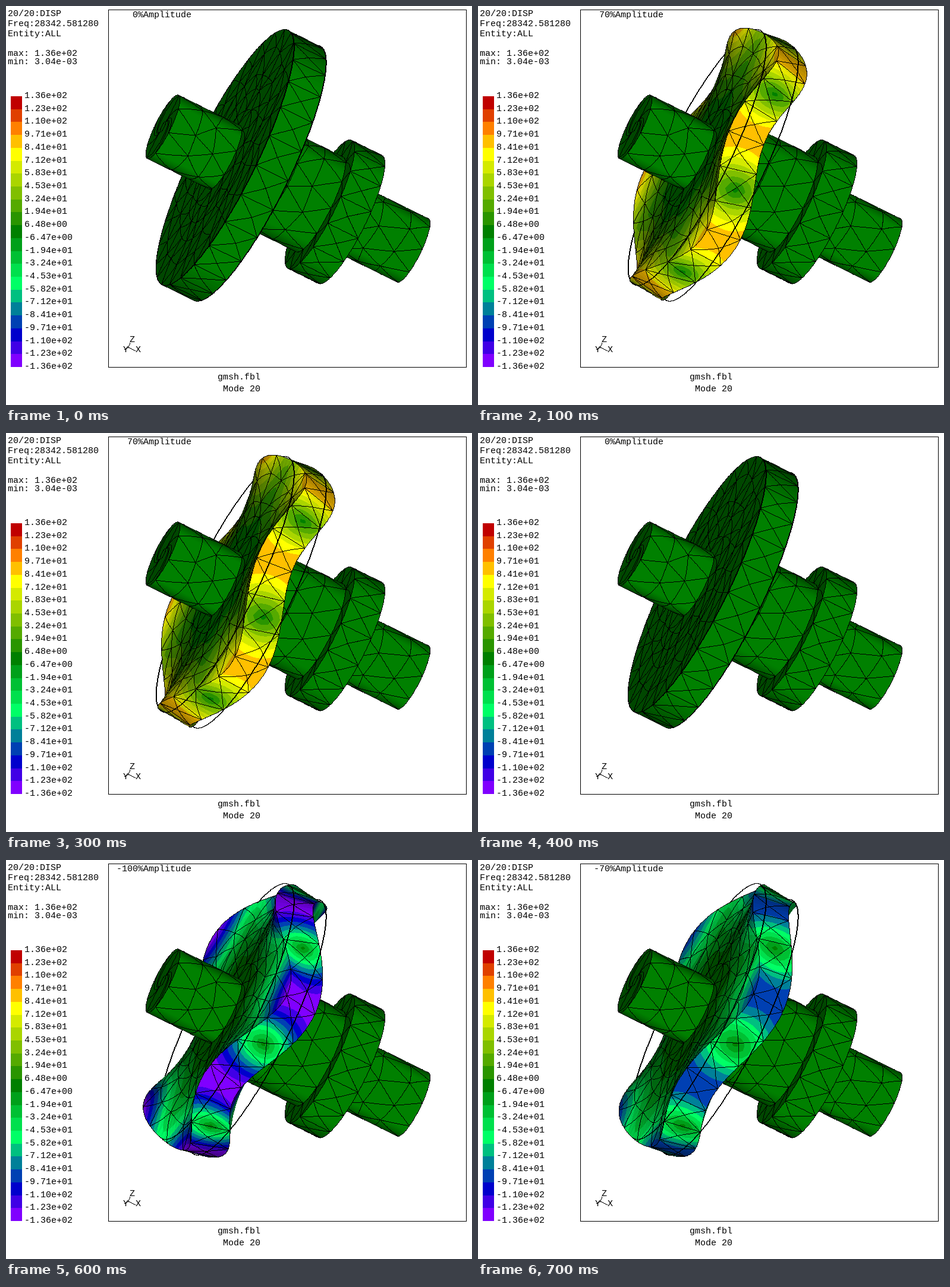
Write an HTML page with a canvas that moves like this. It is 784 px wide and 672 px high and loops after 800 ms.

```html
<!DOCTYPE html>
<html lang="en">
<head>
<meta charset="utf-8">
<title>Mode 20</title>
<style>
html, body { margin: 0; width: 100%; height: 100%; overflow: hidden; background: #fff; }
svg, canvas { position: absolute; left: 0; top: 0; }
text { font: 15px "Liberation Mono", "Courier New", monospace; white-space: pre; }
</style>
</head>
<body>
<svg id="ui" width="784" height="672" shape-rendering="crispEdges">
  <text x="3" y="17">20/20:DISP</text>
  <text x="3" y="34">Freq:28342.581280</text>
  <text x="3" y="51">Entity:ALL</text>
  <text x="3" y="84">max: 1.36e+02</text>
  <text x="3" y="98">min: 3.04e-03</text>
  <text id="amp" x="312" y="19" text-anchor="end">0%Amplitude</text>
  <text x="356" y="629">gmsh.fbl</text>
  <text x="365" y="649">Mode 20</text>
  <g id="legend"></g>
  <path d="M172.5 6.5H774.5V608.5H172.5ZM209 567L206 575L218 581M206 575L199 579" fill="none" stroke="#000"/>
  <text x="208" y="566">Z</text>
  <text x="218" y="583">X</text>
  <text x="197" y="583">Y</text>
</svg>
<canvas id="model" width="784" height="672"></canvas>
<script>
const W = 784, H = 672, TAU = 2 * Math.PI, RAD = Math.PI / 180;
const colors = ('c00000 e04000 ff8000 ffc000 ffff00 d4ea00 aad500 80bf00 55aa00 2a9500 008000 ' +
  '00a01a 00c033 00e04d 00ff66 00c080 008099 0040b3 0000cc 4000e6 8000ff').split(' ');
const pal = colors.map(c => [0, 2, 4].map(i => parseInt(c.slice(i, i + 2), 16)));

// Legend
const labels = ('1.36e+02 1.23e+02 1.10e+02 9.71e+01 8.41e+01 7.12e+01 5.83e+01 4.53e+01 3.24e+01 ' +
  '1.94e+01 6.48e+00 -6.47e+00 -1.94e+01 -3.24e+01 -4.53e+01 -5.82e+01 -7.12e+01 -8.41e+01 ' +
  '-9.71e+01 -1.10e+02 -1.23e+02 -1.36e+02').split(' ');
const STEP = 456 / 21;
document.getElementById('legend').innerHTML =
  colors.map((c, i) => `<rect x="8" y="${152 + i * STEP}" width="19" height="${STEP}" fill="#${c}"/>`).join('') +
  labels.map((t, i) => `<text x="31" y="${155 + Math.round(i * STEP)}">${t}</text>`).join('');

// Orthographic view of a turned part: s runs along the axis, r and f are polar
const X0 = 263.5, Y0 = 203, AX = 0.8962, AY = 0.4436, TILT = 0.22, FLAT = 0.975;
const S1 = 116.3, S2 = 176.4, S3 = 294.6, S4 = 351.5, S5 = 469.5;
const R1 = 59.5, R2 = 239, R3 = 89, R4 = 120.5;
const profile = [[0, 0.01], [0, R1], [S1, R1], [S1, R2], [S2, R2], [S2, R3],
  [S3, R3], [S3, R4], [S4, R4], [S4, R1], [S5, R1], [S5, 0.01]];

// Thick-plate bending with four nodal diameters; TURN scales the section rotation
const WMAX = 30, POW = 2.2, CLAMP = 75, PEAK = 72.5 * RAD, TURN = 0.75;
const UMAX = WMAX * Math.hypot(1, TURN * POW * (S2 - S1) / 2 / FLAT / (R2 - CLAMP));

function point(s, r, f, amp) {
  let v = 0;
  if (amp && r > CLAMP && s < S2 + 1) {
    const h = TURN * (s - (S1 + S2) / 2) / FLAT, q = (r - CLAMP) / (R2 - CLAMP);
    const a = 4 * (f - PEAK), w = amp * WMAX * q ** POW;
    const axial = -w * Math.cos(a);
    const radial = h * w * POW / (r - CLAMP) * Math.cos(a);
    const hoop = -h * 4 * w / r * Math.sin(a);
    v = Math.sign(amp) * 136 * Math.hypot(axial, radial, hoop) / UMAX;
    s += axial * FLAT;
    f += hoop / r;
    r += radial;
  }
  const up = r * Math.cos(f), out = r * Math.sin(f), along = s + TILT * out;
  return {
    x: X0 + AX * along + AY * up,
    y: Y0 + AY * along - AX * up,
    z: FLAT * out - s * TILT / FLAT,
    v
  };
}

// Mesh edges
let seed = 20;
const rnd = () => (seed = seed * 16807 % 2147483647) / 2147483647 - 0.5;
const edges = [], link = (a, b) => edges.push([a, b]);

function ring(s, r, n, off, js = 0, jr = 0) {
  const ja = js || jr ? 0.4 : 0;
  return Array.from({ length: n }, (_, i) =>
    [s + js * rnd(), r + jr * rnd(), (i + off + ja * rnd()) / n * TAU]);
}
function node(g, i) {
  const [s, r, f] = g[i % g.length];
  return [s, r, f + TAU * Math.floor(i / g.length)];
}
function zip(a, b) {
  let i = 0, j = 0;
  while (i < a.length || j < b.length) {
    const p = node(a, i), q = node(b, j), p2 = node(a, i + 1), q2 = node(b, j + 1);
    link(p, q);
    if (j >= b.length || (i < a.length && p2[2] < q2[2])) { link(p, p2); i++; }
    else { link(q, q2); j++; }
  }
}
function cross(a, b) {
  a.forEach((_, i) => {
    const four = [node(a, i), node(a, i + 1), node(b, i + 1), node(b, i)];
    const mid = [0, 1, 2].map(k => four.reduce((t, p) => t + p[k], 0) / 4);
    mid[0] += 12 * rnd();
    four.forEach((p, k) => { link(p, mid); link(p, four[(k + 1) % 4]); });
  });
}
const chain = rings => rings.slice(1).forEach((g, i) => zip(rings[i], g));

const tip = ring(0, R1, 8, 0.1), root = ring(S1, R1, 8, 0.6);
const front = ring(S1, R2, 27, 0.54), back = ring(S2, R2, 27, 0.54);
const seat = ring(S3, R3, 11, 0.7), lip = ring(S3, R4, 15, 0.2);
chain([ring(0, 10, 2, 0.1), tip, ring(39, R1, 8, 0.6, 20), ring(78, R1, 8, 0.2, 20), root,
  ring(S1, 92, 13, 0.5, 0, 10), ring(S1, 125, 18, 0.4, 0, 14),
  ring(S1, 160, 22, 0.6, 0, 16), ring(S1, 200, 26, 0.4, 0, 16), front]);
cross(front, back);
chain([ring(S2, R3, 11, 0.2), ring(216, R3, 11, 0.7, 20), ring(255, R3, 11, 0.2, 20), seat, lip]);
cross(lip, ring(S4, R4, 15, 0.2));
chain([ring(S4, R1, 8, 0.3), ring(391, R1, 8, 0.8, 20), ring(430, R1, 8, 0.3, 20), ring(S5, R1, 8, 0.8)]);
for (const f of [0, Math.PI])
  for (const [s, e, r] of [[0, S1, R1], [S2, S3, R3], [S3, S4, R4], [S4, S5, R1]])
    link([s, r, f], [e, r, f]);

// Depth-buffered drawing
const ctx = document.getElementById('model').getContext('2d');
const depth = new Float32Array(W * H);
let pix;

function tri(a, b, c) {
  const ux = b.x - a.x, uy = b.y - a.y, uz = b.z - a.z;
  const vx = c.x - a.x, vy = c.y - a.y, vz = c.z - a.z;
  const area = ux * vy - uy * vx;
  if (Math.abs(area) < 1e-6) return;
  const nz = Math.abs(area) / Math.hypot(area, uy * vz - uz * vy, uz * vx - ux * vz);
  const shade = Math.min(1, 0.34 + nz);
  const xa = Math.ceil(Math.min(a.x, b.x, c.x)), xb = Math.max(a.x, b.x, c.x);
  const ya = Math.ceil(Math.min(a.y, b.y, c.y)), yb = Math.max(a.y, b.y, c.y);
  for (let y = ya; y <= yb; y++) for (let x = xa; x <= xb; x++) {
    const px = x - a.x, py = y - a.y;
    const m = (px * vy - py * vx) / area, n = (ux * py - uy * px) / area;
    if (m < -1e-6 || n < -1e-6 || m + n > 1.000001) continue;
    const k = y * W + x, z = a.z + m * uz + n * vz;
    if (z <= depth[k]) continue;
    depth[k] = z;
    const v = a.v + m * (b.v - a.v) + n * (c.v - a.v);
    const col = pal[Math.max(0, Math.min(20, Math.floor((136 - v) * 21 / 272)))];
    pix[k] = (255 << 24 | col[2] * shade << 16 | col[1] * shade << 8 | col[0] * shade) >>> 0;
  }
}
function stroke(a, b, wide) {
  const n = Math.ceil(Math.max(Math.abs(b.x - a.x), Math.abs(b.y - a.y))) || 1;
  for (let i = 0; i <= n; i++) {
    const t = i / n, z = a.z + (b.z - a.z) * t + 3;
    const k = Math.round(a.y + (b.y - a.y) * t) * W + Math.round(a.x + (b.x - a.x) * t);
    for (let j = k; j <= k + wide; j++) if (z >= depth[j]) pix[j] = 0xff000000;
  }
}
function curve(p, q, amp, parts, wide = 0) {
  let last;
  for (let i = 0; i <= parts; i++) {
    const [s, r, f] = p.map((v, k) => v + (q[k] - v) * i / parts);
    const next = point(s, r, f, amp);
    if (last) stroke(last, next, wide);
    last = next;
  }
}
function render(amp) {
  const img = ctx.createImageData(W, H), N = 144, CUTS = 8;
  pix = new Uint32Array(img.data.buffer);
  depth.fill(-1e9);
  let prev;
  profile.slice(1).forEach(([s, r], i) => {
    const [s0, r0] = profile[i];
    for (let c = i ? 1 : 0; c <= CUTS; c++) {
      const t = c / CUTS;
      const row = Array.from({ length: N + 1 }, (_, k) =>
        point(s0 + (s - s0) * t, r0 + (r - r0) * t, k / N * TAU, amp));
      if (prev) for (let k = 0; k < N; k++) {
        tri(prev[k], prev[k + 1], row[k]);
        tri(row[k], prev[k + 1], row[k + 1]);
      }
      prev = row;
    }
  });
  for (const [p, q] of edges) curve(p, q, amp, 6);
  // Rest outline of the disc
  for (const s of [S1, S2]) curve([s, R2, 0], [s, R2, TAU], 0, 120, 1);
  return img;
}

const cache = {}, steps = [];
for (let i = 0; i < 8; i++) {
  const amp = Math.sin(i / 8 * TAU), pct = Math.trunc(amp * 100 + Math.sign(amp) * 1e-6);
  steps.push({ pct, img: cache[pct] ||= render(pct ? amp : 0) });
}

const ampText = document.getElementById('amp');
let shown = -1;
function show(i) {
  if (i === shown) return;
  shown = i;
  ctx.putImageData(steps[i].img, 0, 0);
  ampText.textContent = `${steps[i].pct}%Amplitude`;
}
const start = performance.now();
function tick() {
  show(Math.floor((performance.now() - start) % 800 / 100));
  requestAnimationFrame(tick);
}
show(0);
requestAnimationFrame(tick);
</script>
</body>
</html>
```
